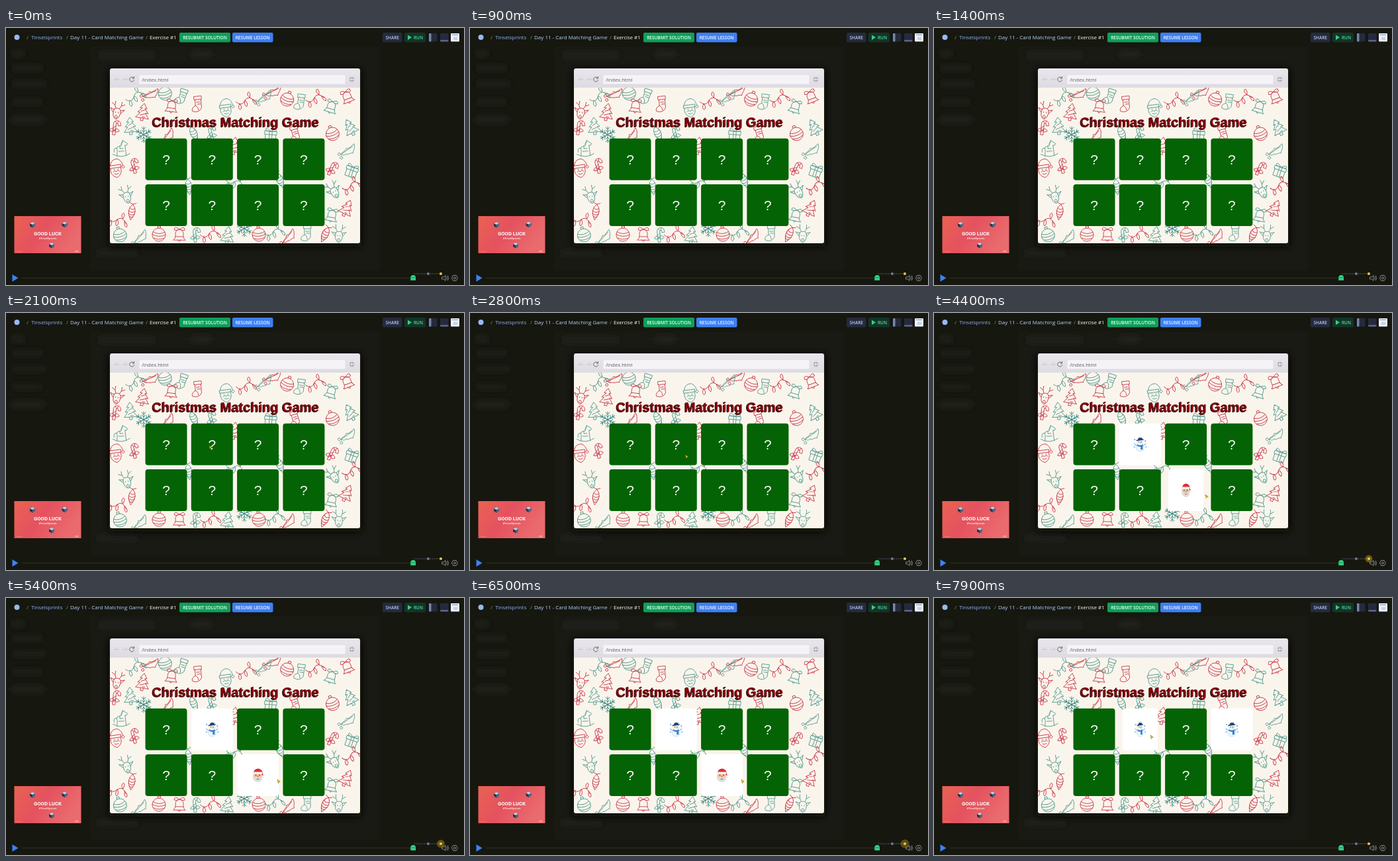
Animation of 692x388 px, one loop 8000 ms. Source, as an HTML page:

```html
<!DOCTYPE html>
<html lang="en">
<head>
<meta charset="utf-8">
<title>Card Matching Game</title>
<style>
  html, body { margin: 0; width: 100%; height: 100%; overflow: hidden; background: #16170f; }
  svg { display: block; width: 692px; height: 388px; font-family: "Open Sans", "Noto Sans", sans-serif; }
  .btn { font-size: 6.5px; font-weight: 600; text-anchor: middle; }
  .title { font: bold 20px "Liberation Sans", Arial, sans-serif; text-anchor: middle; }
  .mark { font: 21px "Liberation Sans", Arial, sans-serif; text-anchor: middle; fill: #f4f7f2; }
  .mid { text-anchor: middle; }
  .line { fill: none; stroke-linecap: round; stroke-linejoin: round; }
</style>
</head>
<body>
<svg viewBox="0 0 692 388">
  <defs>
    <clipPath id="page"><path d="M157 90H535V322Q535 325 532 325H160Q157 325 157 322Z"/></clipPath>
    <filter id="blur" x="-50%" y="-200%" width="200%" height="500%"><feGaussianBlur stdDeviation="5"/></filter>
    <filter id="shade" x="-10%" y="-10%" width="120%" height="120%"><feGaussianBlur stdDeviation="6"/></filter>
    <linearGradient id="bar" x2="0" y2="1"><stop stop-color="#e9e7ec"/><stop offset="1" stop-color="#dddbe1"/></linearGradient>
    <linearGradient id="poster" x2="1" y2=".4">
      <stop stop-color="#ea6252"/><stop offset=".5" stop-color="#e4525f"/><stop offset="1" stop-color="#ea6b6d"/>
    </linearGradient>

    <g id="snowman">
      <path d="M-9-1L-5 2M9-1L5 2" stroke="#5a6b8c" stroke-width=".8"/>
      <circle cy="5" r="6" fill="#edf4fb" stroke="#b9cfe4" stroke-width=".6"/>
      <circle cy="-3" r="4.5" fill="#f4f9fe" stroke="#b9cfe4" stroke-width=".6"/>
      <path d="M-4-6L4-7L3-10L-2-10Z" fill="#24406c"/>
      <path d="M-5.5-5.7L5.5-7" stroke="#24406c" stroke-width="1.3"/>
      <path d="M-4.5 0Q0 3 4.5 0V2.4Q0 5 -4.5 2.4ZM1 2H4V8H1Z" fill="#2683cf"/>
      <circle cx="-1.6" cy="-3.5" r=".7" fill="#222"/><circle cx="1.8" cy="-3.5" r=".7" fill="#222"/>
      <path d="M0-2.6L3-1.8L0-1.4Z" fill="#ee8b2d"/>
      <g fill="#5db4ea"><circle cx="-8" cy="-7" r="1.1"/><circle cx="8" cy="-5" r="1.1"/>
        <circle cx="-8.5" cy="4" r="1"/><circle cx="9" cy="4" r="1"/></g>
    </g>
    <g id="santa">
      <path d="M-7-3Q-6-10 1-10Q8-9 8 2L5-2Z" fill="#dd2e38"/>
      <path d="M-7-2H6V5Q0 10-7 5Z" fill="#f2bf8c"/>
      <path d="M-7.5 1Q-8 10 0 10.5Q8 10 7 1Q4 4 0 3Q-4 4-7.5 1Z" fill="#dcdde2"/>
      <rect x="-8" y="-5" width="15" height="3.6" rx="1.8" fill="#eef0f2"/>
      <circle cx="7.8" cy="2.4" r="1.8" fill="#eef0f2"/>
      <circle cx="-3" r=".8" fill="#422"/><circle cx="2.6" r=".8" fill="#422"/>
      <circle cy="2.2" r="1.2" fill="#e58e63"/>
      <path d="M-2 5.6Q0 7 2 5.6" stroke="#a33" stroke-width=".9" fill="none"/>
    </g>
    <g id="cube">
      <path d="M0-4L4-2V2L0 4.5L-4 2V-2Z" fill="#27344f"/>
      <path d="M0-4L4-2L0 0L-4-2Z" fill="#c4d4de"/>
      <path d="M0 0L4-2V2L0 4.5Z" fill="#526a86"/>
    </g>
  </defs>

  <rect width="692" height="388" fill="#16170f"/>
  <rect x="128" y="28" width="437" height="338" fill="#191a14"/>
  <g fill="#272820" filter="url(#blur)">
    <rect x="8" y="36" width="20" height="6"/><rect x="10" y="58" width="45" height="5"/>
    <rect x="10" y="82" width="50" height="5"/><rect x="10" y="109" width="44" height="5"/>
    <rect x="8" y="134" width="50" height="8"/><rect x="140" y="38" width="85" height="6"/>
    <rect x="280" y="36" width="30" height="7"/><rect x="138" y="337" width="60" height="5"/>
  </g>

  <!-- top bar -->
  <circle cx="16.5" cy="14" r="4" fill="#9ab8f3"/>
  <g font-size="8">
    <g fill="#85878c"><text x="31" y="17.3">/</text><text x="91" y="17.3">/</text><text x="211" y="17.3">/</text></g>
    <text x="38" y="17" fill="#8fb4f6">Tinselsprints</text>
    <text x="97" y="17" fill="#b4d0fb">Day 11 - Card Matching Game</text>
    <text x="217" y="17" font-size="7.7" fill="#fff">Exercise #1</text>
  </g>
  <g class="btn">
    <rect x="262" y="7" width="77" height="14.5" rx="2" fill="#0f9f5b"/>
    <text x="300.5" y="16.6" fill="#eafff3">RESUBMIT SOLUTION</text>
    <rect x="342" y="7" width="61.5" height="14.5" rx="2" fill="#3e80f5"/>
    <text x="372.7" y="16.6" fill="#f1f6ff">RESUME LESSON</text>
    <rect x="569" y="7" width="29.5" height="14.5" rx="2" fill="#252b3d"/>
    <text x="583.7" y="16.7" fill="#b5c8f3">SHARE</text>
    <rect x="602" y="7" width="32" height="14.5" rx="2" fill="#12352a"/>
    <path d="M607 10.5V18L613 14.2Z" fill="#37cf85"/>
    <text x="623" y="16.7" fill="#55d999">RUN</text>
  </g>
  <rect x="639" y="8" width="12.5" height="12.5" rx="1" fill="#252a3e"/>
  <rect x="639" y="8" width="3.5" height="12.5" rx="1" fill="#7486b5"/>
  <rect x="656" y="8" width="12.5" height="12.5" rx="1" fill="#252a3e"/>
  <rect x="656" y="18" width="12.5" height="2.5" rx="1" fill="#57668f"/>
  <rect x="672" y="8" width="13" height="12.5" rx="1" fill="#edf2fc"/>
  <path d="M674 10.2h9" stroke="#8296bf" stroke-width="1.2"/>
  <rect x="676" y="13.5" width="6" height="4.5" fill="#c5d2ec"/>

  <!-- browser window -->
  <rect x="155" y="62" width="382" height="268" rx="4" fill="#090a06" filter="url(#shade)"/>
  <path d="M157 91V64Q157 61 160 61H532Q535 61 535 64V91Z" fill="url(#bar)"/>
  <rect x="201.5" y="71" width="311" height="13.5" rx="1.5" fill="#f5f3f6"/>
  <text x="205" y="80.5" font-size="7.6" fill="#5d5c61">/index.html</text>
  <g class="line" stroke="#cbc9cf">
    <path d="M171 77.5h-7M166.5 75l-2.5 2.5l2.5 2.5M176 77.5h7M180.500 75l2.500 2.500l-2.500 2.500"/>
    <path d="M193 75.5A3.500 3.500 0 1 0 193.500 78.500M193.500 73.500v2.500h-2.500" stroke="#69686d"/>
    <path d="M519.500 76h1.800v-1.800M525.500 76h-1.800v-1.800M519.500 79h1.800v1.800M525.500 79h-1.800v1.800" stroke="#88878c"/>
  </g>
  <g clip-path="url(#page)">
    <rect x="157" y="90" width="378" height="235" fill="#faf5ec"/>
    <g id="paper" class="line" stroke-width=".9"></g>
  </g>
  <g class="title">
    <text x="345.800" y="149.500" fill="#2b0808">Christmas Matching Game</text>
    <text x="347" y="148.800" fill="#850911">Christmas Matching Game</text>
  </g>
  <g id="cards"></g>

  <!-- poster -->
  <rect x="12.500" y="284" width="101" height="56" fill="url(#poster)"/>
  <use href="#cube" x="40" y="297"/><use href="#cube" x="88.500" y="296.500"/><use href="#cube" x="69" y="328"/>
  <g class="mid" fill="#fff">
    <text x="63" y="313" font-size="7.700" font-weight="700" font-family="Roboto, sans-serif">GOOD LUCK</text>
    <text x="63" y="318.500" font-size="3.900" font-weight="600">#TinselSprints</text>
    <text x="20" y="337.500" font-size="2" opacity=".6">day eleven</text>
    <text x="107" y="337.500" font-size="2.600">play</text>
  </g>

  <!-- player bar -->
  <path d="M24 377.500H612" stroke="#2a2b24" stroke-width="1.500"/>
  <path d="M9.500 372V383L18.500 377.500Z" fill="#3c82f6"/>
  <path d="M617 371H657" stroke="#6c6c70" stroke-dasharray="1.500 1.500"/>
  <path d="M611.300 381.500V377Q611.300 373 615.200 373Q619 373 619 377V381.500L617 380.500L615.200 381.500L613.300 380.500Z" fill="#2fd68a"/>
  <path d="M613.800 376.200v1.500M616.600 376.200v1.500" stroke="#0d4a30"/>
  <circle cx="638" cy="371" r="2" fill="#78779c"/>
  <circle id="halo" cx="657" cy="371" fill="#bd9a20"/>
  <circle cx="657" cy="371" r="2" fill="#efcb43"/>
  <g class="line" stroke="#92939a" stroke-width=".9">
    <path d="M659 376h2l3-2.500v8l-3-2.500h-2zM666 375.500q1.500 2 0 4M667.500 374q2.500 3.500 0 7"/>
    <path d="M675.800 373.500h4.400l2.200 4l-2.200 4h-4.400l-2.200-4z"/><circle cx="678" cy="377.500" r="1.600"/>
  </g>

  <path id="cursor" d="M0 0L4.300 3.200L2.400 3.700L1.300 5.800Z" fill="#e9c92f" stroke="#6b5a10" stroke-width=".5"/>
</svg>

<script>
const LOOP = 8000, STEP = 100, FLIP = 500;
const $ = id => document.getElementById(id);

// wallpaper: line drawings about 24 px across, centred on 0,0
const ARM = 'M0 0V-12M-3-11L0-8L3-11M-3-7L0-4L3-7';
const SHAPES = {
  holly: 'M-11 8C-9 2-5 4-4-2C0-1 2-5 7-10C10-3 6 0 7 4C2 4 0 8-4 7C-6 10-9 8-11 8ZM-11 8L5-6M-10 11a2 2 0 1 0 .1 0M-14 6a2 2 0 1 0 .1 0',
  bauble: 'M0-9a10 10 0 1 0 .1 0ZM-2-9v-3h4v3M-9-3Q0 2 9-3M-10 1Q0 6 10 1M-8 6Q0 10 8 6',
  stocking: 'M-5-12h11v5h-11zM-4-7V2Q-11 5-9 10Q0 14 5 6V-7M-4 2Q0 3 0 9M-2-3h5M-1 0h5',
  tree: 'M0-13L5-6H2L8 1H4L10 9H-10L-4 1H-8L-2-6H-5ZM-2 9v4h4v-4M-4 5L4 2M-3-1L3-4M0 7h4',
  candy: 'M-3 12V-4A5.500 5.500 0 0 1 8-4V-2H4V-4A1.500 1.500 0 0 0 1-4V12ZM-3 8l4-3M-3 2l4-3M-1-8l3 3M4-9l-1 3M-8 6Q-4 0-1 5Q3 0 7 6Q2 10-1 5Q-4 10-8 6',
  santa: 'M-8-4Q-6-14 4-13Q10-10 11-2M-9-4h17v4h-17zM-8 0Q-11 10 0 15Q10 10 7 0M-5 6Q-2 3 0 6Q2 3 5 6M-3 2v1M3 2v1M11-2a2 2 0 1 0 .1 0M-3 9Q0 11 3 9',
  deer: 'M-5-2Q-7 10 0 13Q7 10 5-2Q0-6-5-2M-3-4Q-6-8-5-14M-5-8L-10-11M3-4Q6-8 5-14M5-8L10-11M-5-1L-11-3L-6 3M5-1L11-3L6 3M-2 2v1M2 2v1M0 7a2 2 0 1 0 .1 0',
  lights: 'M-14-4Q-8 6 0-3Q7-10 14 2M-9 0q-5 5-2 9q5-1 2-9M0-3q-4 6 0 10q4-4 0-10M8-5q3-7 0-9q-5 3 0 9M11-2q0 8 4 9q3-4-4-9',
  bell: 'M-9 7Q-5 4-6-3Q-5-9 0-9Q5-9 6-3Q5 4 9 7ZM-2 7q2 5 4 0M-6 2h12M0-9Q-8-15-8-8Q-4-6 0-9Q8-15 8-8Q4-6 0-9',
  cone: 'M0-12Q10-3 0 12Q-10-3 0-12M-4-6Q0-2 4-6M-5-2Q0 3 5-2M-5 2Q0 7 5 2M-3 6Q0 10 3 6M0-12L-5-14M0-12L5-14',
  horse: 'M-13 9Q0 17 13 9M-7 12L-6 4Q-9-3 0-3L3-11L10-6L8-3L6-4L7 12M-4 5H4M-7 0Q-12-1-11 6M3-11L0-5M-2-3v4h5',
  gift: 'M-9-4H9V1H-9ZM-8 1V11H8V1M-2-4V11M2-4V11M0-4Q-9-12-8-5ZM0-4Q9-12 8-5Z'
};
const RED = {
  holly: [220, 99, 405, 96, 245, 162, 428, 314], bauble: [231, 311, 382, 311, 493, 159, 425, 107],
  stocking: [290, 115, 437, 160], lights: [362, 112, 467, 108, 522, 240, 168, 292, 308, 313],
  santa: [166, 211], candy: [193, 207, 493, 211, 165, 149], tree: [515, 272, 345, 178, 207, 127],
  bell: [516, 105, 262, 313, 250, 119], cone: [190, 278, 482, 312], deer: [168, 125]
};
const TEAL = {
  holly: [392, 103, 518, 184, 204, 315], bauble: [240, 98, 172, 312], stocking: [266, 104, 445, 112, 455, 310],
  lights: [195, 105, 405, 310, 345, 235], santa: [332, 120], tree: [188, 148, 520, 150, 335, 313],
  horse: [174, 181], deer: [182, 252, 495, 245, 503, 311], gift: [523, 214, 400, 160],
  cone: [284, 160, 276, 240, 414, 230], bell: [491, 120, 492, 284], candy: [286, 311, 310, 158]
};

function drawing(d, x, y, turn, color) {
  return `<path d="${d}" stroke="${color}" transform="translate(${x} ${y}) rotate(${turn})"/>`;
}
function wallpaper(places, color) {
  let out = '';
  for (const [name, spots] of Object.entries(places))
    for (let i = 0; i < spots.length; i += 2) {
      const turn = name === 'santa' ? -8 : (spots[i] * 7 + spots[i + 1] * 3) % 56 - 28;
      out += drawing(SHAPES[name], spots[i], spots[i + 1], turn, color);
    }
  return out;
}
function snowflake(x, y) {
  return [0, 60, 120, 180, 240, 300].map(a => drawing(ARM, x, y, a, '#33857f')).join('');
}
$('paper').innerHTML = wallpaper(RED, '#c93e50') + wallpaper(TEAL, '#569b90') +
  snowflake(208, 161) + snowflake(360, 303);

// cards
const FACES = { 1: 'snowman', 3: 'snowman', 6: 'santa' };
const cards = Array.from({ length: 8 }, (_, i) => {
  const x = 242 + i % 4 * 69.3, y = i < 4 ? 198.200 : 267.500;
  const box = fill => `<rect x="-31.500" y="-31.500" width="63" height="63" rx="4" fill="${fill}"/>`;
  $('cards').insertAdjacentHTML('beforeend', `<g>
    <g>${box('#046304')}<text class="mark" y="7.500">?</text></g>
    <g>${box('#fff')}${FACES[i] ? `<use href="#${FACES[i]}"/>` : ''}</g></g>`);
  const node = $('cards').lastElementChild;
  return { x, y, node, front: node.children[0], back: node.children[1] };
});

// card, start time, +1 opens and -1 closes
const FLIPS = [[1, 3000, 1], [6, 4140, 1], [1, 6700, -1], [6, 6700, -1], [3, 7200, 1], [1, 7640, 1]];
const CURSOR = [[1800, 300, 240], [2100, 307, 200], [2800, 325.500, 214], [3700, 325.500, 214], [4000, 410, 274],
  [6700, 410, 274], [7100, 452, 206], [7250, 452, 206], [7550, 327, 207]];
const HALO = [[3300, 0, .9], [3600, 4, .8], [4400, 5.500, .5], [6500, 6.500, .4], [7200, 7, 0]];

const clamp = v => Math.min(1, Math.max(0, v));

// CSS "ease", solved by bisection
function ease(x) {
  if (x <= 0 || x >= 1) return clamp(x);
  let lo = 0, hi = 1;
  for (let i = 0; i < 20; i++) {
    const s = (lo + hi) / 2;
    if (.75 * s * (1 - s) + s ** 3 < x) lo = s; else hi = s;
  }
  return .3 * lo * (1 - lo) ** 2 + 3 * lo * lo * (1 - lo) + lo ** 3;
}

function track(keys, t) {
  const next = keys.findIndex(k => k[0] > t);
  if (next === 0) return keys[0].slice(1);
  if (next < 0) return keys[keys.length - 1].slice(1);
  const a = keys[next - 1], b = keys[next], p = (t - a[0]) / (b[0] - a[0]);
  return [1, 2].map(i => a[i] + (b[i] - a[i]) * p);
}

function draw(t) {
  cards.forEach((card, i) => {
    let turn = 0;
    for (const [n, start, dir] of FLIPS)
      if (n === i) turn += dir * ease((t - start) / FLIP);
    const c = Math.cos(turn * Math.PI);
    card.front.style.display = c >= 0 ? '' : 'none';
    card.back.style.display = c < 0 ? '' : 'none';
    card.node.setAttribute('transform', `translate(${card.x} ${card.y}) scale(${Math.abs(c)} 1)`);
  });

  const [x, y] = track(CURSOR, t);
  $('cursor').setAttribute('transform', `translate(${x} ${y})`);
  $('cursor').style.display = t < CURSOR[0][0] ? 'none' : '';

  const [r, alpha] = track(HALO, t);
  $('halo').setAttribute('r', r);
  $('halo').setAttribute('opacity', alpha);
}

const begin = performance.now();
function tick() {
  const t = (performance.now() - begin) % LOOP;
  draw(Math.floor(t / STEP) * STEP);
  requestAnimationFrame(tick);
}
tick();
</script>
</body>
</html>
```
